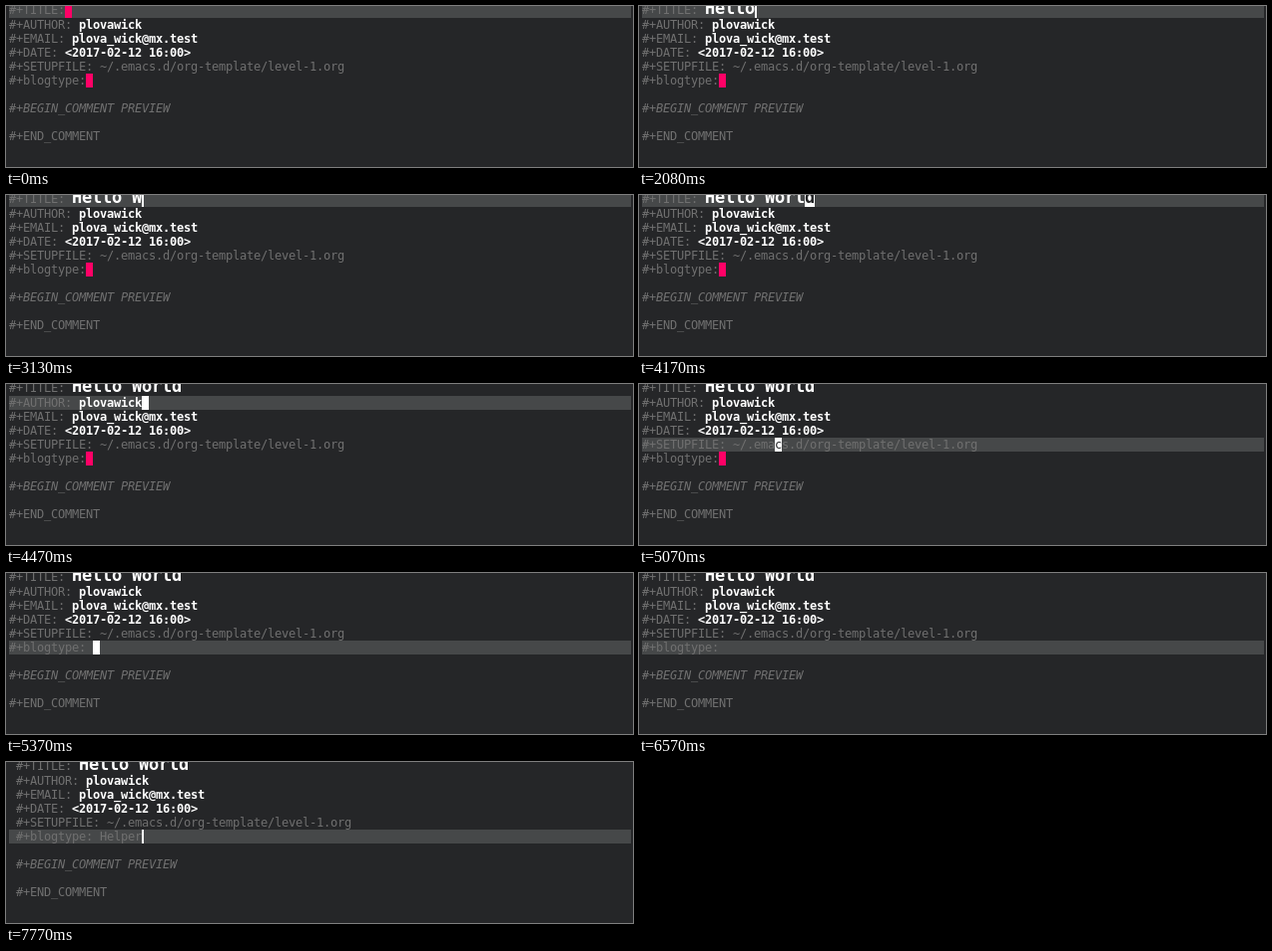
Recreate the animation shown at these times as an HTML page with a canvas. Size 628 by 162 pixels, loop 8 s.

```html
<!DOCTYPE html>
<html lang="en">
<head>
<meta charset="utf-8">
<title>Org editing</title>
<style>
html, body { margin: 0; width: 100%; height: 100%; overflow: hidden; background: #252628; }
canvas { display: block; }
</style>
</head>
<body>
<canvas id="stage" width="628" height="162"></canvas>
<script>
const ctx = document.getElementById("stage").getContext("2d");
const LOOP = 8000, CELL = 7, BIG = 10, ROW = 14, LEFT = 3, KEY = 9, LAST = 5;
const BG = "#252628", BAND = "#464849", GRAY = "#707070", WHITE = "#ffffff", PINK = "#ff0066";
const FAMILY = "'DejaVu Sans Mono', monospace";
const PLAIN = "12px " + FAMILY, BOLD = "bold 12px " + FAMILY;
const ITALIC = "italic 12px " + FAMILY, TITLE = "bold 17px " + FAMILY;

// Each line: gray key, then white value.
const lines = [
  ["#+TITLE: ", "Hello World"],
  ["#+AUTHOR: ", "plovawick"],
  ["#+EMAIL: ", "plova_wick@mx.test"],
  ["#+DATE: ", "<2017-02-12 16:00>"],
  ["#+SETUPFILE: ~/.emacs.d/org-template/level-1.org", ""],
  ["#+blogtype: ", ""],
  ["", ""],
  ["#+BEGIN_COMMENT PREVIEW", ""],
  ["", ""],
  ["#+END_COMMENT", ""]
];

// Each step changes part of the editor state.
const type = (time, typed) => [time, { typed, col: KEY + typed, cursor: "bar" }];
const blink = (time, cursor) => [time, { cursor }];
const move = (time, row, col = 19) => [time, { row, col, cursor: "block" }];
const steps = [
  [0, { row: 0, col: 8, cursor: "", typed: 0, tag: "", indent: 0 }],
  type(600, 0), blink(1050, ""),
  type(1350, 1), type(1640, 2), type(1787, 3), type(1933, 4), type(2080, 5),
  blink(2680, ""), type(2830, 6), type(3130, 7),
  type(3430, 8), type(3575, 9), type(3720, 11),
  move(4170, 0), move(4470, 1), move(4770, 2), move(4920, 3), move(5070, 4),
  move(5370, LAST, 12),
  blink(5820, ""), blink(6120, "bar"), blink(6570, ""), blink(7020, "bar"), blink(7620, ""),
  [7770, { tag: "Helper", col: 18, cursor: "bar", indent: CELL }]
];

function stateAt(time) {
  const state = {};
  for (const [start, change] of steps) if (start <= time) Object.assign(state, change);
  return state;
}

const isBig = (row, col) => row === 0 && col >= KEY;
const cellWidth = (row, col) => isBig(row, col) ? BIG : CELL;
const cellX = (row, col) => LEFT + (isBig(row, col) ? KEY * CELL + (col - KEY) * BIG : col * CELL);
const rowTop = row => row ? row * ROW - 2 : 0;
const rowHeight = row => row ? ROW : 12;
const baseline = row => row ? rowTop(row) + 11 : 8;

function box(row, x, width, color) {
  ctx.fillStyle = color;
  ctx.fillRect(x, rowTop(row), width, rowHeight(row));
}

function fontFor(row, col) {
  if (isBig(row, col)) return TITLE;
  if (row === 7) return ITALIC;
  return col >= lines[row][0].length && row !== LAST ? BOLD : PLAIN;
}

function glyph(char, row, col, color, indent) {
  ctx.font = fontFor(row, col);
  ctx.fillStyle = color;
  ctx.fillText(char, cellX(row, col) + indent, baseline(row));
}

function draw(time) {
  const { row, col, cursor, typed, tag, indent } = stateAt(time);
  ctx.fillStyle = BG;
  ctx.fillRect(0, 0, 628, 162);
  box(row, LEFT, 623, BAND);

  if (time < 600) box(0, cellX(0, 8), CELL, PINK);
  if (row !== LAST) box(LAST, cellX(LAST, 11), CELL, PINK);

  const texts = lines.map(([key, value], r) =>
    key + (r === 0 ? value.slice(0, typed) : r === LAST ? tag : value));
  texts.forEach((text, r) => [...text].forEach((char, c) => {
    const gray = r === LAST || c < lines[r][0].length;
    glyph(char, r, c, gray ? GRAY : WHITE, indent);
  }));

  if (!cursor) return;
  const block = cursor === "block";
  box(row, cellX(row, col) + indent, block ? cellWidth(row, col) : 2, WHITE);
  if (block) glyph(texts[row][col] || " ", row, col, BG, indent);
}

function tick() {
  draw(performance.now() % LOOP);
  requestAnimationFrame(tick);
}
tick();
</script>
</body>
</html>
```
